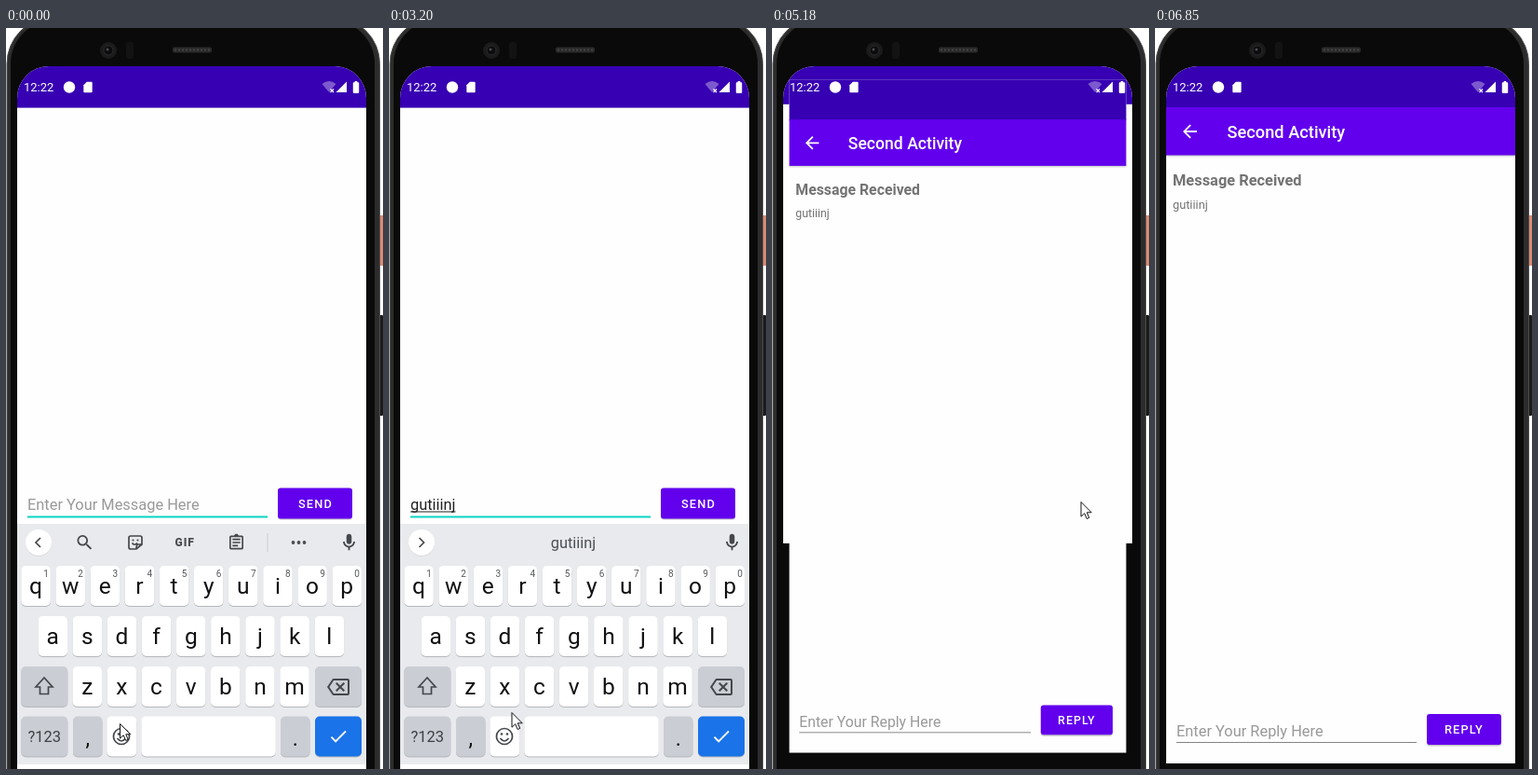
Recreate the animation shown at these times as an HTML page. Size 405 by 795 pixels, loop 7.63 s.

```html
<!DOCTYPE html>
<html lang="en">
<head>
<meta charset="utf-8">
<title>Message app</title>
<style>
  html, body { margin: 0; width: 100%; height: 100%; overflow: hidden; background: #fff; }
  svg { display: block; width: 100%; height: 100%; font-family: Roboto, sans-serif; }
  text { white-space: pre; }
  .field { font-size: 16.4px; }
  .hint { fill: #999; }
  .btn { font-size: 12.76px; font-weight: 500; letter-spacing: 1.14px; fill: #fff; }
  .mid { text-anchor: middle; }
  .line { fill: none; stroke: #44474b; stroke-width: 1.7; }
</style>
</head>
<body>
<svg viewBox="0 0 405 795">
  <defs>
    <clipPath id="glass"><path d="M12 795V75A34 34 0 0 1 46 41H353A34 34 0 0 1 387 75V795Z"/></clipPath>
    <clipPath id="sendClip"><rect x="292" y="493.500" width="80" height="33" rx="3"/></clipPath>
    <linearGradient id="drop" x2="0" y2="1">
      <stop stop-color="#000" stop-opacity=".25"/><stop offset="1" stop-color="#000" stop-opacity="0"/>
    </linearGradient>
  </defs>

  <!-- phone body -->
  <rect x="400" y="201" width="5" height="54" fill="#dc8a74"/>
  <rect x="400" y="308" width="5" height="108" rx="1" fill="#1b1b1b"/>
  <rect x="1" y="-11.500" width="400.500" height="900" rx="50" fill="#2c2c2c" stroke="#4c4c4c"/>
  <rect x="5" y="-8" width="391" height="900" rx="46" fill="#0a0a0b"/>
  <circle cx="110" cy="24" r="9" fill="#1b1b1c"/>
  <circle cx="110" cy="24" r="5" fill="#0c0c0e" stroke="#2c2c2f"/>
  <circle cx="109" cy="23" r="1.500" fill="#4a4a50"/>
  <rect x="129" y="15" width="8" height="18" rx="3" fill="#131314"/>
  <rect x="179" y="20.500" width="42" height="6" rx="2" fill="#2a2a2b"/>
  <path d="M181 23.500H220" stroke="#444" stroke-width="2" stroke-dasharray="2 2"/>

  <g clip-path="url(#glass)">
    <rect x="12" y="41" width="375" height="754" fill="#0a0a0b"/>

    <g id="main">
      <rect x="12" y="41" width="375" height="511" fill="#fefefe"/>
      <rect x="0" y="30" width="405" height="55.600" fill="#3700b3"/>
      <text id="hint" class="field hint" x="23" y="517">Enter Your Message Here</text>
      <text id="typed" class="field" x="23" y="517" fill="#202020"></text>
      <rect id="under" x="23" y="518.500" height="1" fill="#222"/>
      <rect id="caret" y="500" width="1.700" height="22" fill="#03dac5"/>
      <rect x="23" y="523.500" width="258" height="2" fill="#0ad5c4"/>
      <rect id="sendShade" x="292" width="80" height="33" rx="3" fill="#000" opacity=".22"/>
      <rect x="292" y="493.500" width="80" height="33" rx="3" fill="#6200ee"/>
      <circle id="ripple" cx="330" cy="510" fill="#fff" clip-path="url(#sendClip)"/>
      <text class="btn" x="314" y="515">SEND</text>
    </g>

    <g id="keyboard">
      <rect x="12" y="532" width="375" height="258" fill="#e8eaed"/>
      <rect x="12" y="790" width="375" height="5" fill="#fefefe"/>
      <circle cx="35" cy="552.800" r="14" fill="#000" opacity=".1"/>
      <circle cx="35" cy="552" r="14" fill="#fff"/>
      <path id="chevron" class="line"/>
      <g id="tools" fill="#4a4d51">
        <path class="line" d="M134 545H144Q146 545 146 547V554L140 559H134Q132 559 132 557V547Q132 545 134 545ZM146 554H142Q140 554 140 559M135.500 552.500Q138 556 141 552.500"/>
        <circle cx="136.500" cy="549.500" r="1.100"/><circle cx="141.500" cy="549.500" r="1.100"/>
        <text x="181.500" y="556" font-size="12" font-weight="900" letter-spacing="1">GIF</text>
        <rect x="280.500" y="542" width="1" height="20" fill="#c9cccf"/>
        <circle cx="308.500" cy="552" r="1.900"/><circle cx="314.500" cy="552" r="1.900"/><circle cx="320.500" cy="552" r="1.900"/>
      </g>
      <path id="dividers" d="M143.500 541V563M253.500 541V563" stroke="#c9cccf"/>
      <g id="words" class="field mid" fill="#4c5055"></g>
      <g id="keys"></g>
      <path class="line" d="M41 697L32 707H36.500V714.500H45.500V707H50Z"/>
      <g class="line"><circle cx="124" cy="760" r="8.500"/><path d="M119.500 762Q124 768 128.500 762"/></g>
      <circle cx="121" cy="757.500" r="1.300" fill="#44474b"/><circle cx="127" cy="757.500" r="1.300" fill="#44474b"/>
    </g>

    <g id="second">
      <rect x="12" y="41" width="375" height="748" fill="#fefefe"/>
      <rect x="12" y="41" width="375" height="45" fill="#3700b3"/>
      <rect x="12" y="136" width="375" height="3" fill="url(#drop)"/>
      <rect x="12" y="85" width="375" height="51.500" fill="#6200ee"/>
      <text x="77.500" y="118" font-size="18.230" font-weight="500" fill="#fff">Second Activity</text>
      <g fill="#737373">
        <text x="19" y="169" font-size="16.400" font-weight="700">Message Received</text>
        <text x="19" y="194" font-size="12.760">gutiiinj</text>
      </g>
      <text class="field hint" x="23" y="760">Enter Your Reply Here</text>
      <rect x="23" y="766" width="258" height="1" fill="#858585"/>
      <rect x="292" y="737.500" width="80" height="33" rx="3" fill="#000" opacity=".22"/>
      <rect x="292" y="736" width="80" height="33" rx="3" fill="#6200ee"/>
      <text class="btn" x="311" y="757">REPLY</text>
    </g>

    <!-- status bar -->
    <g id="status" fill="#fff">
      <text x="19" y="68" font-size="13">12:22</text>
      <circle cx="68" cy="63.500" r="6.200"/>
      <path d="M347 69L339.500 60Q347 54 354.500 60Z" opacity=".35"/>
      <path d="M348.500 65.500L352 69M352 65.500L348.500 69" stroke="#fff" stroke-width="1.200"/>
      <path d="M354.500 69H366V57.500Z"/>
    </g>
  </g>

  <path id="mouse" d="M.5 .5V16.200L4.200 12.800L6.700 18.500L9.200 17.400L6.800 11.800H11.700Z" fill="#fff" stroke="#111" stroke-width="1"/>
</svg>

<script>
const $ = id => document.getElementById(id);
const LOOP = 7630;

function add(parent, tag, attrs, text) {
  const el = document.createElementNS("http://www.w3.org/2000/svg", tag);
  for (const k in attrs) el.setAttribute(k, attrs[k]);
  if (text) el.textContent = text;
  return parent.appendChild(el);
}

// 24-unit icon centred on (x, y)
function icon(parent, d, x, y, size, fill) {
  add(parent, "path", { d, fill, transform: `translate(${x - size / 2} ${y - size / 2}) scale(${size / 24})` });
}

const keys = $("keys"), PITCH = 37.13, DARK = "#44474b";
function key(x, y, w, label, size = 24.5, fill = "#fff", base = 30) {
  add(keys, "rect", { x, y: y + 1, width: w, height: 43, rx: 5, fill: "#b4b7bb" });
  add(keys, "rect", { x, y, width: w, height: 43, rx: 5, fill });
  if (label) add(keys, "text", { x: x + w / 2, y: y + base, class: "mid", "font-size": size, fill: size < 20 ? "#3c4043" : "#111" }, label);
}
[["qwertyuiop", 16.3, 577], ["asdfghjkl", 34.5, 631], ["zxcvbnm", 71.5, 685]].forEach(([row, x0, y]) =>
  [...row].forEach((c, i) => {
    key(x0 + i * PITCH, y, 31.5, c);
    if (y === 577) add(keys, "text", { x: 43 + i * PITCH, y: 588.5, class: "mid", "font-size": 10, fill: "#55585c" }, String((i + 1) % 10));
  }));
const GREY = "#cacdd3";
key(16.3, 685, 50, "", 0, GREY);
key(332, 685, 50, "", 0, GREY);
key(16.3, 738.5, 50, "?123", 16.5, GREY, 27.5);
key(72, 738.5, 31.5, ",", 23, GREY, 31);
key(108.3, 738.5, 32, "");
key(145.3, 738.5, 144.5, "");
key(295, 738.5, 31.5, ".", 23, GREY, 31);
key(332, 738.5, 50, "", 0, "#1a73e8");

icon($("keyboard"), "M22 3H7c-.69 0-1.23.35-1.59.88L0 12l5.41 8.110c.36.53.9.89 1.590.89h15c1.100 0 2-.9 2-2V5c0-1.100-.9-2-2-2zm0 16H7.070L2.400 12l4.660-7H22v14zm-11.590-2L14 13.410 17.590 17 19 15.590 15.410 12 19 8.410 17.590 7 14 10.590 10.410 7 9 8.410 12.590 12 9 15.590z", 357, 707, 24, DARK);
icon($("keyboard"), "M9 16.170 4.830 12l-1.420 1.410L9 19 21 7l-1.410-1.410z", 357, 760, 23, "#fff");
icon($("keyboard"), "M12 14c1.660 0 3-1.340 3-3V5c0-1.660-1.340-3-3-3S9 3.340 9 5v6c0 1.660 1.340 3 3 3zm5-3c0 2.760-2.240 5-5 5s-5-2.240-5-5H5c0 3.530 2.610 6.430 6 6.920V21h2v-3.080c3.390-.49 6-3.390 6-6.920h-2z", 368.5, 552, 22, DARK);
icon($("tools"), "M15.500 14h-.79l-.28-.27A6.470 6.470 0 0 0 16 9.500 6.500 6.500 0 1 0 9.500 16c1.610 0 3.090-.59 4.230-1.570l.27.28v.79l5 4.990L20.490 19zm-6 0C7 14 5 12 5 9.500S7 5 9.500 5 14 7 14 9.500 12 14 9.500 14z", 84.5, 552, 21.5, DARK);
icon($("tools"), "M7 15h7v2H7zm0-4h10v2H7zm0-4h10v2H7zm12-4h-4.180C14.400 1.840 13.300 1 12 1s-2.400.84-2.820 2H5a2 2 0 0 0-2 2v14c0 1.100.9 2 2 2h14c1.100 0 2-.9 2-2V5c0-1.100-.9-2-2-2zm0 16H5V5h14z", 247.5, 552, 20, DARK);
icon($("second"), "M20 11H7.830l5.590-5.590L12 4l-8 8 8 8 1.410-1.410L7.830 13H20z", 37.5, 111, 22.5, "#fff");
icon($("status"), "M18 2h-8L4 8v12c0 1.100.9 2 2 2h12c1.100 0 2-.9 2-2V4c0-1.100-.9-2-2-2z", 88, 63.5, 14, "#fff");
icon($("status"), "M15.670 4H14V2h-4v2H8.330C7.600 4 7 4.600 7 5.330v15.330C7 21.400 7.600 22 8.330 22h7.330c.74 0 1.340-.6 1.340-1.330V5.330C17 4.600 16.400 4 15.670 4z", 376, 63.5, 15.5, "#fff");

const words = [94, 198, 302].map(x => add($("words"), "text", { x, y: 558 }));

// Each list holds [start ms, value]; a value holds until the next start.
const WORD = "gutiiinj";
const typedLen = [[0, 0], [280, 1], [550, 2], [1120, 3], [1700, 4], [1970, 6], [2510, 8]];
const underLen = [[0, 0], [430, 1], [840, 2], [1240, 3], [1820, 4], [1970, 5], [2120, 6], [2650, 7], [2800, 8], [4820, 0]];
const caretOn = [[0, 0], [130, 1], [2260, 0], [2510, 1], [3200, 0], [3680, 1], [4260, 0], [4670, 1]];
const suggest = [[0, ""], [430, "g|good|going"], [840, "gu|guy|guess"], [1390, "gut|guy|but"], [1820, "|guti|"],
  [1970, "gutii"], [2260, "gutiii"], [2650, "gutiiin"], [2800, "gutiiinj"]];
const mousePos = [[0, [122, 746]], [3200, [131.5, 734]], [3320, [196, 688]], [3440, [275, 628]], [3560, [345, 574]],
  [3680, [380, 547]], [3830, [371, 533]], [3980, [349, 519]], [4110, [334, 509]], [4260, [331.5, 508]],
  [6120, [270, 580]], [6250, [204, 656]], [6400, [206, 663]], [6700, [256, 781]], [6850, null]];
const ripple = [[0, [0, 0]], [4520, [25, .2]], [4670, [48, .24]], [4820, [48, .12]], [4940, [0, 0]]];
const mainScale = [[0, 1], [5060, 1.0035], [5180, 1.01]];
const secondScale = [[0, 0], [5180, .965], [5300, .9958], [5420, 1]];

const at = (list, t) => list.filter(e => e[0] <= t).pop()[1];
const show = (id, on) => $(id).style.display = on ? "" : "none";
const zoom = (id, s) => $(id).setAttribute("transform", `translate(200 462) scale(${s}) translate(-200 -462)`);
const prefix = n => n ? $("typed").getSubStringLength(0, n) : 0;

function draw(t) {
  const n = at(typedLen, t), list = at(suggest, t);
  $("typed").textContent = WORD.slice(0, n);
  show("hint", !n);
  $("under").setAttribute("width", prefix(Math.min(n, at(underLen, t))));
  $("caret").setAttribute("x", 22.8 + prefix(n));
  show("caret", at(caretOn, t));

  const parts = list.includes("|") ? list.split("|") : ["", list, ""];
  words.forEach((w, i) => w.textContent = parts[i]);
  show("tools", !list);
  show("dividers", list.includes("|"));
  $("chevron").setAttribute("d", list ? "M32.500 547L37.500 552L32.500 557" : "M37 547L32 552L37 557");

  const [r, alpha] = at(ripple, t);
  $("ripple").setAttribute("r", r);
  $("ripple").setAttribute("opacity", alpha);
  $("sendShade").setAttribute("y", t >= 4670 && t < 4940 ? 498 : 494.5);

  const s = at(secondScale, t);
  show("second", s);
  show("keyboard", !s);
  show("main", s < 1);
  zoom("main", at(mainScale, t));
  if (s) zoom("second", s);

  const m = at(mousePos, t);
  show("mouse", m);
  if (m) $("mouse").setAttribute("transform", `translate(${m})`);
}

const start = performance.now();
function tick(now) {
  draw(Math.max(0, now - start) % LOOP);
  requestAnimationFrame(tick);
}
draw(0);
requestAnimationFrame(tick);
</script>
</body>
</html>
```
